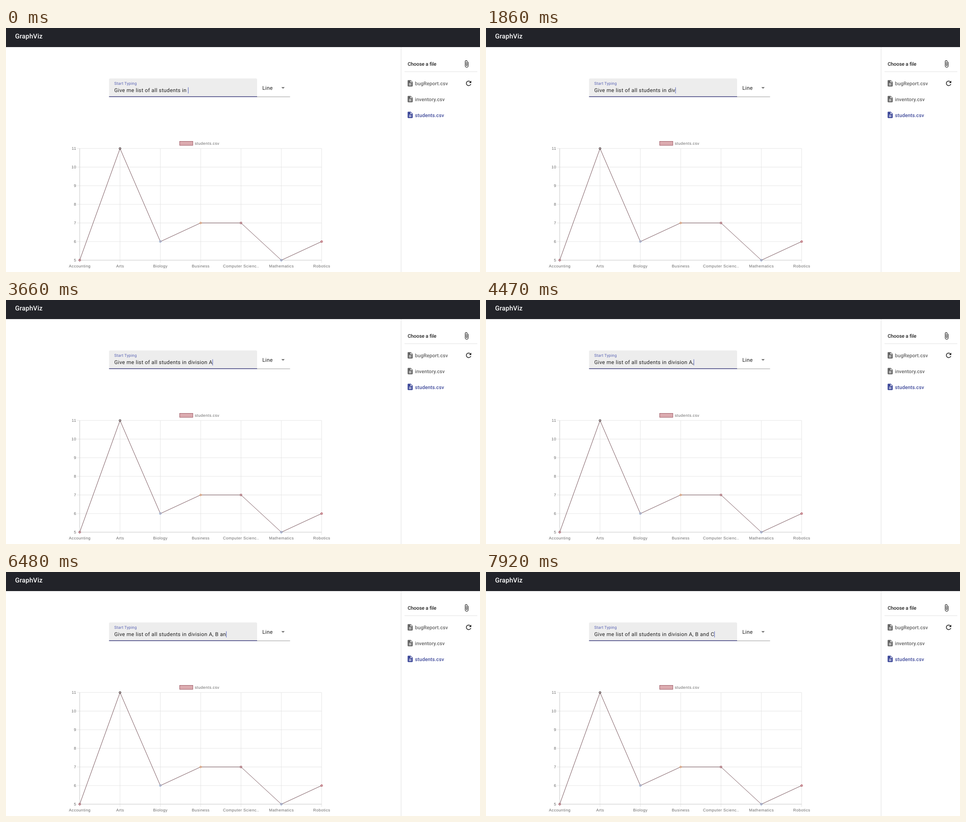
Write an HTML page that moves like this. It is 1042 px wide and 537 px high and loops after 8 s.

```html
<!DOCTYPE html>
<html lang="en">
<head>
<meta charset="utf-8">
<title>GraphViz</title>
<style>
  html, body { margin: 0; width: 100%; height: 100%; overflow: hidden; background: #fff; }
  svg { display: block; }
  text { font: 11.57px Roboto, sans-serif; letter-spacing: .03125em; fill: #1f1f1f;
         text-rendering: geometricPrecision; white-space: pre; }
  .brand { font-size: 14.46px; font-weight: 500; letter-spacing: .0125em; fill: #fff; }
  .label { font-size: 8.68px; fill: #5660b3; }
  .pick { font-size: 10.85px; font-weight: 500; letter-spacing: 0; }
  .file { font-size: 11px; font-weight: 500; letter-spacing: .08px; fill: #666; }
  .active { fill: #3f4a9a; }
  #chart text { font: 8.68px "Liberation Sans", Arial, sans-serif; letter-spacing: .49px; fill: #666; }
  .mid { text-anchor: middle; }
  .end { text-anchor: end; }
</style>
</head>
<body>
<svg id="stage" width="1042" height="537" viewBox="0 0 1042 537">
  <defs>
    <path id="doc" d="M14 2H6c-1.1 0-1.99.9-1.99 2L4 20c0 1.1.89 2 1.99 2H18c1.1 0 2-.9 2-2V8l-6-6zm2 16H8v-2h8v2zm0-4H8v-2h8v2zm-3-5V3.5L18.5 9H13z"/>
  </defs>

  <rect width="1042" height="42" fill="#222329"/>
  <text class="brand" x="20" y="23.2">GraphViz</text>

  <path d="M226.5 152V114a3 3 0 0 1 3-3H549a3 3 0 0 1 3 3V152z" fill="#ededed"/>
  <rect x="226.5" y="150.5" width="325.5" height="1.4" fill="#333377"/>
  <text class="label" x="238" y="125">Start Typing</text>
  <text id="query" x="238" y="141.2"></text>
  <rect id="caret" y="130.5" width=".9" height="13.5" fill="#3f51b5"/>

  <text x="563.5" y="135.7">Line</text>
  <path d="M605.3 130h7.4l-3.7 3.8z" fill="#757575"/>
  <rect x="552" y="151" width="72.5" height=".9" fill="#8f8f8f"/>

  <rect x="868" y="42" width="1" height="495" fill="#e0e0e0"/>
  <rect x="876" y="95.6" width="160" height=".9" fill="#dedede"/>
  <text class="pick" x="883" y="82.7">Choose a file</text>
  <path transform="translate(1003.8 70.4) scale(.72)" d="M16.5 6v11.5c0 2.21-1.79 4-4 4s-4-1.79-4-4V5c0-1.38 1.12-2.5 2.5-2.5s2.5 1.12 2.5 2.5v10.5c0 .55-.45 1-1 1s-1-.45-1-1V6H10v9.5c0 1.38 1.12 2.5 2.5 2.5s2.5-1.12 2.5-2.5V5c0-2.21-1.79-4-4-4S7 2.79 7 5v12.5c0 3.04 2.46 5.5 5.5 5.5s5.5-2.46 5.5-5.5V6h-1.5z" fill="#1f1f1f"/>
  <path transform="translate(1008.4 113.1) scale(.72)" d="M17.65 6.35C16.2 4.9 14.21 4 12 4c-4.42 0-7.99 3.58-7.99 8s3.57 8 7.99 8c3.73 0 6.84-2.55 7.73-6h-2.08c-.82 2.33-3.04 4-5.65 4-3.31 0-6-2.69-6-6s2.69-6 6-6c1.66 0 3.14.69 4.22 1.78L13 11h7V4l-2.35 2.35z" fill="#1f1f1f"/>
  <g id="files"></g>

  <g id="chart">
    <rect x="381.8" y="249.4" width="29" height="8.8" fill="#dcabb0" stroke="#8a3f4b" stroke-width=".8"/>
    <text x="415" y="256.8">students.csv</text>
  </g>
</svg>
<script>
const $ = id => document.getElementById(id);

function add(parent, tag, attrs, text = '') {
  const el = document.createElementNS('http://www.w3.org/2000/svg', tag);
  for (const key in attrs) el.setAttribute(key, attrs[key]);
  el.textContent = text;
  parent.append(el);
}

['bugReport.csv', 'inventory.csv', 'students.csv'].forEach((name, i) => {
  const y = 121.8 + i * 34.75;
  const cls = i === 2 ? 'file active' : 'file';
  add($('files'), 'use', { href: '#doc', class: cls, fill: '#616161', transform: `translate(880.1 ${y - 8.5}) scale(.7)` });
  add($('files'), 'text', { class: cls, x: 899, y: y + 4.3 }, name);
});

// Chart
const chart = $('chart');
const px = i => 162 + i * 88.65;
const py = v => 511 - (v - 5) * 40.97;
const data = [
  ['Accounting', 5, '#8f3446'], ['Arts', 11, '#1c1c1c'], ['Biology', 6, '#78a9dc'],
  ['Business', 7, '#e5a25f'], ['Computer Scienc..', 7, '#8f4450'],
  ['Mathematics', 5, '#6d9fd6'], ['Robotics', 6, '#a83a48']
];
const grid = (d, stroke = '#e3e3e3') =>
  add(chart, 'path', { d, stroke, 'stroke-width': .9, fill: 'none' });

for (let v = 5; v <= 11; v++) {
  grid(`M156.2 ${py(v)}H694`);
  add(chart, 'text', { class: 'end', x: 154.6, y: py(v) + 3.1 }, v);
}
data.forEach(([name], i) => {
  grid(`M${px(i)} 265.2V516.8`);
  add(chart, 'text', { class: 'mid', x: px(i) + .2, y: 526.8 }, name);
});
grid('M162 265.2V511H694', '#cfcfcf');
add(chart, 'polyline', {
  points: data.map(([, v], i) => [px(i), py(v)]).join(' '),
  fill: 'none', stroke: '#6d474e', 'stroke-width': .95
});
data.forEach(([, v, stroke], i) => add(chart, 'circle', {
  cx: px(i), cy: py(v), r: 2.1, fill: '#dcabb0', 'fill-opacity': .6, stroke, 'stroke-width': 1
}));

// Typing: [time, typed letters, caret shown]
const START = 'Give me list of all students in ';
const TYPED = 'division A, B and C';
const LOOP = 8000;
const steps = [
  [0, 0, 1], [210, 0, 0], [690, 0, 1], [1110, 0, 0],
  [1290, 1, 1], [1440, 2, 1], [1860, 3, 1], [2010, 4, 1],
  [2310, 5, 1], [2430, 6, 1], [2520, 7, 1], [2640, 8, 1], [3090, 8, 0],
  [3270, 9, 1], [3660, 10, 1], [4110, 10, 0],
  [4470, 11, 1], [4920, 11, 0], [4980, 12, 1], [5340, 13, 1],
  [5700, 14, 1], [6150, 14, 0], [6360, 15, 1], [6480, 16, 1], [6570, 17, 1],
  [6720, 18, 1], [7020, 19, 1], [7470, 19, 0], [7920, 19, 1]
];
const query = $('query'), caret = $('caret');
let shown;

function draw() {
  const t = performance.now() % LOOP;
  const step = steps.findLast(s => s[0] <= t);
  if (step !== shown) {
    shown = step;
    query.textContent = START + TYPED.slice(0, step[1]);
    caret.setAttribute('x', 238 + query.getComputedTextLength());
    caret.setAttribute('opacity', step[2]);
  }
  requestAnimationFrame(draw);
}
draw();
</script>
</body>
</html>
```
